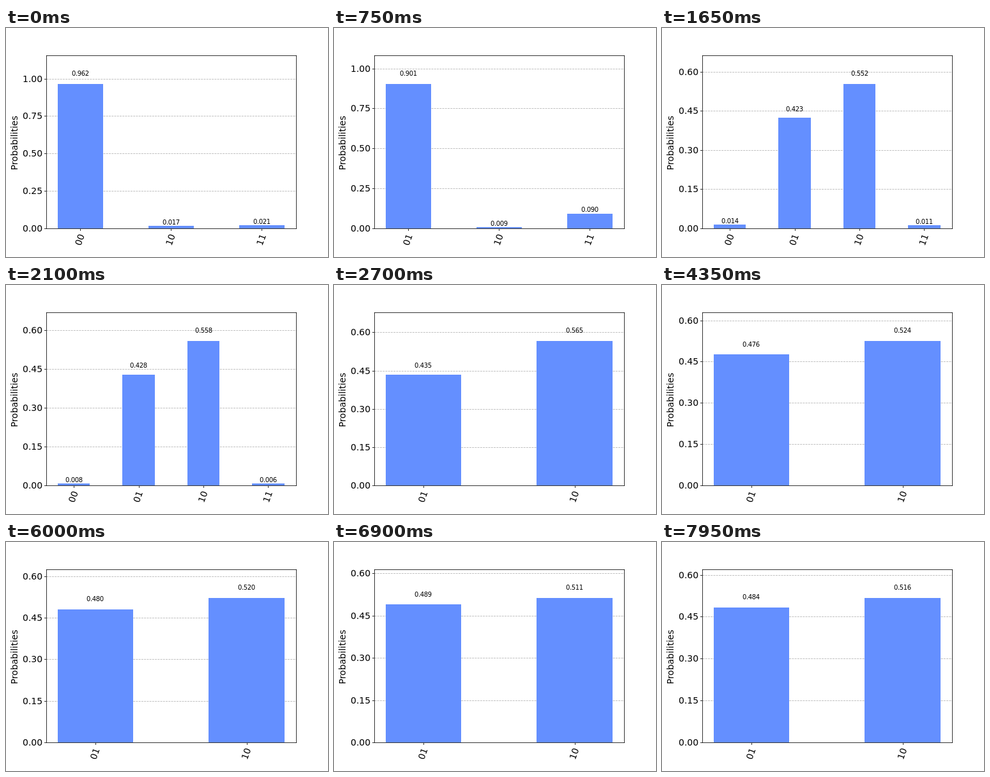
An HTML page for the animation above (8 s loop, 504 by 360 pixels).

```html
<!DOCTYPE html>
<html lang="en">
<head>
<meta charset="utf-8">
<title>Probabilities</title>
<style>
  html, body { margin: 0; width: 100%; height: 100%; overflow: hidden; background: #fff; }
  svg { display: block; width: 504px; height: 360px; }
  text { font: 14px "DejaVu Sans", sans-serif; fill: #000; }
  .mid { text-anchor: middle; }
  .val { font-size: 10px; letter-spacing: -.036em; }
  .axis { stroke: #000; stroke-width: .8; stroke-linecap: square; fill: none; }
  .mark { stroke: #000; stroke-width: .8; }
  .grid { stroke: #b0b0b0; stroke-width: .8; stroke-dasharray: 2.96 1.28; }
  .bar { fill: #648fff; }
</style>
</head>
<body>
<svg id="chart" viewBox="0 0 504 360"></svg>
<script>
const LOOP = 8000, STEP = 150;
const LEFT = 63, RIGHT = 453.6, BASE = 315, HEIGHT = 271.8;
const STATES = ["00", "01", "10", "11"];

// Key measurements: step, then the probability of each state.
const KEYS = [
  [0, .962, 0, .017, .021],
  [5, 0, .901, .009, .090],
  [11, .014, .423, .552, .011],
  [18, 0, .435, .565, 0],
  [29, 0, .476, .524, 0],
  [40, 0, .480, .520, 0],
  [53, 0, .484, .516, 0]
];
const SETTLED = 18, NOISE = .016, HIDDEN = .0045;

const svg = document.getElementById("chart");
const random = n => {
  const s = Math.sin(n * 12.9898) * 43758.5453;
  return s - Math.floor(s);
};
const path = (cls, d) => `<path class="${cls}" d="${d}"/>`;
const label = (cls, x, y, str, turn = "") =>
  `<text class="${cls}" x="${x}" y="${y}"${turn && ` transform="${turn}"`}>${str}</text>`;

// Drift between the keys, with sampling noise once two states remain.
function measure(k) {
  const i = KEYS.findIndex(key => key[0] >= k);
  const b = KEYS[i], a = KEYS[Math.max(0, i - 1)];
  const t = b[0] === k ? 1 : (k - a[0]) / (b[0] - a[0]);
  const noise = k > SETTLED && t < 1 ? NOISE * (2 * random(k) - 1) : 0;
  const shift = [0, -noise, noise, 0];
  return STATES
    .map((name, n) => ({ name, p: a[n + 1] + (b[n + 1] - a[n + 1]) * t + shift[n] }))
    .filter(bar => bar.p > HIDDEN);
}

function draw(k) {
  const bars = measure(k);
  const top = 1.2 * Math.max(...bars.map(b => b.p));
  const scale = HEIGHT / top;
  const tick = [.1, .15, .2, .25].find(s => s * 5 >= top);
  const digits = tick === .1 || tick === .2 ? 1 : 2;
  const indent = digits === 1 ? 9 : 0;
  let grid = "", marks = "", rects = "", texts = "";

  for (let i = 0; i * tick <= top; i++) {
    const y = BASE - i * tick * scale;
    const line = Math.round(y) + .5;
    if (i) grid += path("grid", `M63.5 ${line}H454`);
    marks += `M60 ${line}H63`;
    texts += label("", 26 + indent, Math.round(y + 5), (i * tick).toFixed(digits));
  }

  const margin = (RIGHT - LEFT) / 22;
  const unit = (RIGHT - LEFT - 2 * margin) / (bars.length - .5);
  bars.forEach((b, i) => {
    const x0 = LEFT + margin + i * unit;
    const mid = x0 + unit / 4;
    const h = b.p * scale;
    const x = Math.round(x0), y = Math.round(BASE - h - .01);
    rects += `<rect class="bar" x="${x}" y="${y}" width="${Math.round(x0 + unit / 2) - x}" height="${BASE - y}"/>`;
    marks += `M${Math.round(mid) + .5} 316V319`;
    texts += label("val", Math.round(mid - 13.5), Math.round(BASE - h * 1.05 - 2), b.p.toFixed(3));
    texts += label("mid", 0, 5, b.name, `translate(${mid - .9} 332.8) rotate(-70)`);
  });

  texts += label("mid", 0, 0, "Probabilities", `translate(${18 + indent} 180.8) rotate(-90)`);
  const spines = ["M63.5 43.5V315.5", "M454.5 43.5V315.5", "M63.5 43.5H454.5", "M63.5 315.5H454.5"]
    .map(d => path("axis", d)).join("");
  svg.innerHTML = grid + rects + spines + path("mark", marks) + texts;
}

let shown = -1;
const start = performance.now();
function frame() {
  const k = Math.floor(((performance.now() - start) % LOOP) / STEP);
  if (k !== shown) draw(shown = k);
  requestAnimationFrame(frame);
}
frame();
</script>
</body>
</html>
```
